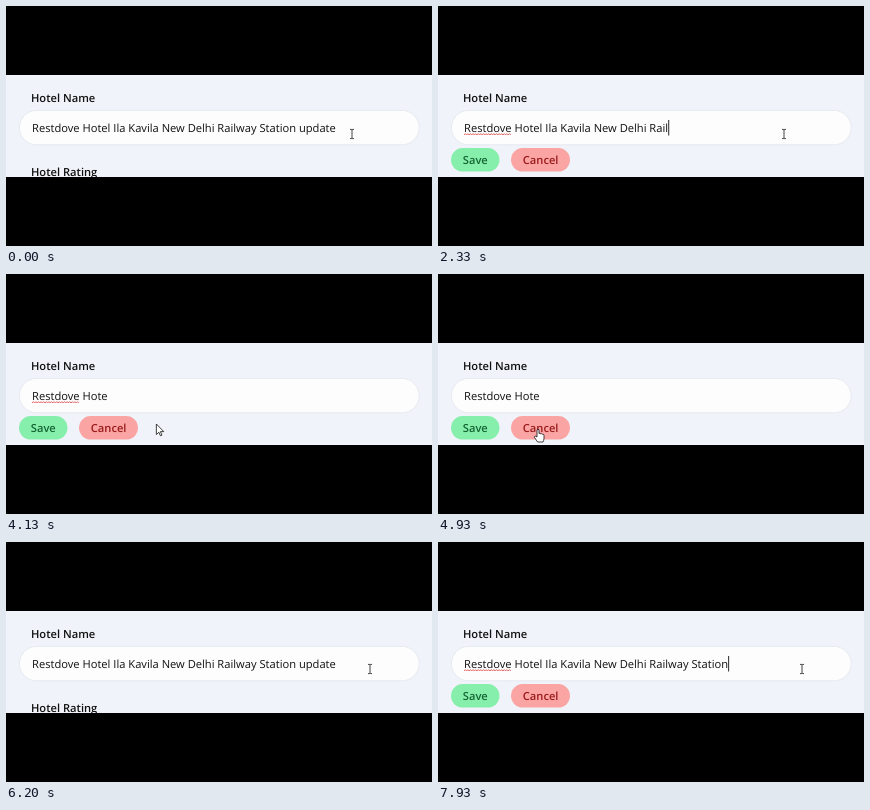
Write an HTML page that moves like this. It is 426 px wide and 240 px high and loops after 8000 ms.

```html
<!DOCTYPE html>
<html lang="en">
<head>
<meta charset="utf-8">
<title>Hotel name editor</title>
<style>
  html, body { margin: 0; width: 100%; height: 100%; overflow: hidden; background: #000; }
  svg { display: block; width: 100vw; height: 100vh; }
  text {
    font: 11.15px "Open Sans", "Noto Sans", sans-serif;
    fill: #111;
    white-space: pre;
    text-rendering: geometricPrecision;
  }
  .label { font-weight: 600; }
  .outline { fill: none; stroke: #111; stroke-width: .8; }
  .solid { fill: #fff; stroke: #111; stroke-width: .8; stroke-linejoin: round; }
</style>
</head>
<body>
<svg viewBox="0 0 426 240">
  <clipPath id="band"><rect y="69" width="426" height="102"/></clipPath>
  <rect width="426" height="240"/>
  <g clip-path="url(#band)">
    <rect y="69" width="426" height="102" fill="#f0f4fa"/>
    <text class="label" x="25" y="96">Hotel Name</text>
    <rect x="13.4" y="104.4" width="399.8" height="34.4" rx="17.2" fill="#fdfdfe" stroke="#e2e6ec" stroke-width=".8"/>
    <text id="value" x="26" y="126.3"></text>
    <path id="squiggle" fill="none" stroke="#e04848" stroke-width=".8"/>
    <rect id="caret" y="114" width=".9" height="15.5" fill="#111"/>
    <text id="rating" class="label" x="25" y="170.2">Hotel Rating</text>
    <g id="buttons">
      <rect x="13" y="142" width="48.5" height="23.6" rx="11.8" fill="#86efac"/>
      <text class="label" x="24.8" y="158" style="fill:#166534">Save</text>
      <rect x="73" y="142" width="59" height="23.6" rx="11.8" fill="#fba4a4"/>
      <text class="label" x="84.8" y="158" style="fill:#991b1b">Cancel</text>
    </g>
    <g id="pointer">
      <path id="beam" class="outline" d="M-2-4.6H-.6L0-4.2L.6-4.6H2M0-4.2V4.2M-2 4.6H-.6L0 4.2L.6 4.6H2"/>
      <path id="arrow" class="solid" d="M0 0V10.5L2.5 8.2L4.1 11.8L5.6 11.1L4 7.6H7.4Z"/>
      <path id="hand" class="solid" d="M-1 6.5V.3Q0-.9 1 .3V4Q2 3.2 2.8 4.3Q3.9 3.7 4.5 4.8Q5.8 4.4 6 5.8V9Q5.8 11 5 12.5H-.4Q-1.6 10.6-3.6 7.8Q-3.4 5.6-1 7.5Z"/>
    </g>
  </g>
</svg>
<script>
const LOOP = 8000, REPEAT_DELAY = 500, REPEAT = 33.4, BLINK = 530;
const NAME = "Restdove Hotel Ila Kavila New Delhi Railway Station update";

// Each editing session: click in, hold backspace, optionally blur and cancel.
const sessions = [
  { open: 700, press: 1279, max: 45, blur: 4850, close: 5000 },
  { open: 6800, press: 7246, max: 7, blur: LOOP, close: LOOP }
];

// time, x, y of the pointer's hot spot
const route = [
  [0, 346, 128], [3270, 346, 128], [3400, 338, 131], [3850, 215, 143],
  [4350, 100, 155.5], [5150, 100, 155.5], [5600, 270, 138],
  [6000, 364, 127], [LOOP, 364, 127]
];

const [value, squiggle, caret, rating, buttons, pointer, beam, arrow, hand] =
  ["value", "squiggle", "caret", "rating", "buttons", "pointer", "beam", "arrow", "hand"]
    .map(id => document.getElementById(id));

const show = (el, on) => { el.style.display = on ? "" : "none"; };

function deletedCount(t, { press, max }) {
  if (t < press) return 0;
  const held = t - press - REPEAT_DELAY;
  return held < 0 ? 1 : Math.min(max, 2 + Math.floor(held / REPEAT));
}

function lastInput(n, { open, press }) {
  if (!n) return open;
  return n === 1 ? press : press + REPEAT_DELAY + (n - 2) * REPEAT;
}

function pointerAt(t) {
  const i = route.findIndex(p => p[0] > t);
  const [t0, x0, y0] = route[i - 1], [t1, x1, y1] = route[i];
  const k = (t - t0) / (t1 - t0);
  return [x0 + (x1 - x0) * k, y0 + (y1 - y0) * k];
}

function drawSquiggle() {
  value.textContent = NAME.split(" ")[0];
  const width = value.getComputedTextLength();
  let d = "M26 129";
  for (let x = 1.3, up = true; x < width; x += 1.3, up = !up) d += `L${26 + x} ${up ? 127.6 : 129}`;
  squiggle.setAttribute("d", d);
}

function draw(t) {
  const session = sessions.find(s => t >= s.open && t < s.close);
  const n = session ? deletedCount(t, session) : 0;
  const focused = session && t < session.blur;

  value.textContent = NAME.slice(0, NAME.length - n);
  caret.setAttribute("x", 26.2 + value.getComputedTextLength());
  show(caret, focused && Math.floor((t - lastInput(n, session)) / BLINK) % 2 === 0);
  show(squiggle, focused && n > 0);
  show(buttons, session);
  show(rating, !session);

  const [x, y] = pointerAt(t);
  const overField = y < 139;
  const overCancel = session && y > 142 && x > 73 && x < 132;
  pointer.setAttribute("transform", `translate(${x} ${y})`);
  show(beam, overField);
  show(hand, overCancel);
  show(arrow, !overField && !overCancel);
}

drawSquiggle();
const start = performance.now();
function tick() {
  draw((performance.now() - start) % LOOP);
  requestAnimationFrame(tick);
}
tick();
</script>
</body>
</html>
```
